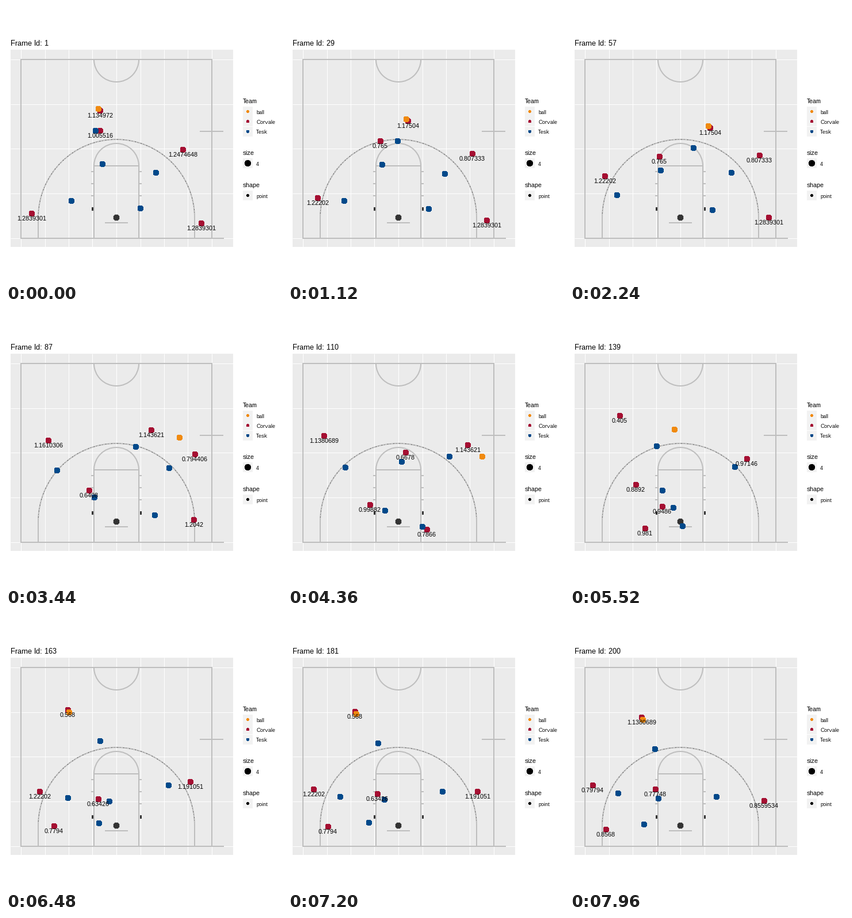
A matplotlib script for the animation above (8 s loop, 480x480 px).

```python
import matplotlib.pyplot as plt
import numpy as np
from matplotlib.animation import FuncAnimation
from matplotlib.patches import Arc, Circle, Rectangle

SIZE, DPI, FRAMES, STEP = 480, 100, 200, 40
PT = 72 / DPI
RED, BLUE, ORANGE = "#A50F32", "#00498A", "#F08A10"
GRAY, DARK = "#BEBEBE", "#333333"
LEFT, RIGHT, TOP, BASE = 26, 358, 93, 404      # half court
MID, RIM, LANE, REACH = 192, 368, 39, 136      # centre, rim, key and arc radii

plt.rcParams.update({
    "font.family": "Liberation Sans",
    "text.hinting": "native",
    "text.hinting_factor": 1,
})

fig = plt.figure(figsize=(SIZE / DPI, SIZE / DPI), dpi=DPI, facecolor="white")
ax = fig.add_axes([0, 0, 1, 1])
ax.set_xlim(0, SIZE)
ax.set_ylim(SIZE, 0)
ax.axis("off")


def line(xs, ys, color=GRAY, width=2, z=2):
    ax.plot(xs, ys, color=color, lw=width * PT, zorder=z,
            solid_capstyle="butt", solid_joinstyle="miter")


def box(x0, y0, x1, y1, color, z=1):
    ax.add_patch(Rectangle((x0, y0), x1 - x0, y1 - y0, fc=color, lw=0, zorder=z))


def dot(x, y, r, color, z=3):
    return ax.add_patch(Circle((x, y), r, fc=color, lw=0, zorder=z, antialiased=False))


def arc(y, r, start, end, color=GRAY, width=2, dash="-"):
    ax.add_patch(Arc((MID, y), 2 * r, 2 * r, theta1=start, theta2=end,
                     ec=color, lw=width * PT, ls=dash, zorder=2))


def text(x, y, s, px, ha="left"):
    return ax.text(x, y, s, fontsize=px * PT, ha=ha, va="baseline", zorder=6)


def draw_court():
    box(8, 76, 395, 419, "#EBEBEB", 0)
    for x in np.linspace(LEFT, RIGHT, 9).round() - 0.5:
        line([x, x], [76, 419], "white", 1, 1)
    for y in np.linspace(TOP, BASE, 5).round() - 0.5:
        line([8, 395], [y, y], "white", 1, 1)

    line([LEFT, LEFT, RIGHT, RIGHT], [BASE, TOP, TOP, BASE])
    line([LEFT - 1, 379], [BASE, BASE])
    line([337, 378], [218, 218])
    arc(TOP, LANE, 0, 180)

    foul = 278
    line([MID - LANE, MID - LANE, MID + LANE, MID + LANE], [BASE, foul, foul, BASE])
    arc(foul, LANE, 180, 360)
    arc(RIM, REACH, 180, 360)
    arc(RIM, REACH, 183, 357, DARK, 0.8, (0, (2, 4, 1, 6)))
    for side in (-1, 1):
        edge = MID + side * (LANE + 3)
        for y in (288, 309, 330):
            line([edge - 2, edge + 2], [y, y])
        box(edge - 1.5, 350, edge + 1.5, 356, DARK, 2)
        line([MID + side * REACH] * 2, [BASE, RIM])

    line([MID - 20, MID + 20], [377, 377])
    dot(MID, RIM, 5.5, GRAY, 2)
    dot(MID, RIM, 4.7, DARK, 2)


def draw_legend():
    def group(y, heading, *rows):
        text(412, y, heading, 11)
        for k, (label, color, r) in enumerate(rows):
            mid = y + 14.5 + 17.3 * k
            box(412, mid - 8.6, 429, mid + 8.6, "#F2F2F2")
            dot(420.5, mid, r, color)
            text(435, mid + 4, label, 9)

    group(169, "Team", ("ball", ORANGE, 2), ("Corvale", RED, 2), ("Tesk", BLUE, 2))
    group(259, "size", ("4", "black", 5))
    group(315, "shape", ("point", "black", 2))


BEATS = np.array([0, 56, 86, 109, 138, 162, 199])
NOW = np.arange(FRAMES)
STAGE = np.searchsorted((BEATS[1:] + BEATS[:-1]) / 2, NOW, "right")


def glide(times, points):
    """Smooth curve through the points, one position per frame."""
    p = np.array(points, float)
    m = np.gradient(p, times, axis=0)
    k = np.clip(np.searchsorted(times, NOW, "right") - 1, 0, len(times) - 2)
    h = (times[k + 1] - times[k])[:, None]
    u = (NOW - times[k])[:, None] / h
    ease = u * u * (3 - 2 * u)
    return (p[k] * (1 - ease) + p[k + 1] * ease
            + h * u * (1 - u) * (m[k] * (1 - u) - m[k + 1] * u))


def guard(man, *gaps):
    """A defender moves with his man while the gap between them shifts."""
    return man + glide(BEATS[::2], gaps)


def throw(start, end, first, last):
    """Share of a pass completed, and the flight from one holder to the next."""
    u = np.clip((NOW - first) / (last - first), 0, 1)[:, None]
    lift = np.hstack([0 * u, -16 * np.sin(np.pi * u)])
    return start + (end - start) * u + lift


handler = glide(BEATS, [(164, 182), (244, 212), (253, 209), (205, 248),
                        (161, 342), (161, 322), (149, 305)])
screener = glide(BEATS, [(164, 217), (156, 262), (145, 314), (143, 339),
                         (115, 304), (59, 309), (40, 298)])
wing = glide(BEATS, [(308, 250), (330, 260), (329, 251), (313, 235),
                     (308, 259), (321, 292), (338, 325)])
trailer = glide(BEATS, [(45, 361), (61, 296), (74, 227), (63, 219),
                        (87, 184), (108, 167), (125, 180)])
runner = glide(BEATS, [(340, 378), (346, 368), (327, 365), (242, 382),
                       (131, 380), (84, 369), (63, 375)])

attack = [
    (handler, "1.134972 1.17504 1.143621 0.6678 0.9486 0.63426 0.77748"),
    (screener, "1.005516 0.765 0.6408 0.99882 0.8892 1.22202 0.79794"),
    (wing, "1.2474648 0.807333 0.794406 1.143621 0.97146 1.191051 0.8559534"),
    (trailer, "1.2839301 1.22202 1.1610306 1.1380689 0.405 0.568 1.1380689"),
    (runner, "1.2839301 1.2839301 1.2042 0.7866 0.981 0.7794 0.8568"),
]
defence = [
    guard(handler, (-8, 35), (-27, 29), (19, 2), (5, 16)),
    guard(screener, (4, 58), (9, 12), (46, 10), (44, 14)),
    guard(wing, (-47, 40), (-45, 24), (-21, 14), (-83, -7)),
    guard(trailer, (69, -22), (15, 52), (64, 53), (23, 55)),
    guard(runner, (-106, -26), (-68, -8), (65, -4), (66, -9)),
]

# the ball goes from handler to wing, then across to the trailer
held = throw(handler + (-3, -3), wing + (25, 20), 77, 95)
ball = np.where(NOW[:, None] < 120, held,
                throw(wing + (25, 20), trailer + (2, 4), 120, 149))

draw_court()
draw_legend()
title = text(8, 69, "", 13)
movers = [(dot(0, 0, 5, RED), route, text(0, 0, "", 11, "center"), values.split())
          for route, values in attack]
movers += [(dot(0, 0, 5, BLUE), route, None, None) for route in defence]
movers.append((dot(0, 0, 5, ORANGE, 4), ball, None, None))


def update(i):
    title.set_text(f"Frame Id: {i + 1}")
    for mark, route, label, values in movers:
        x, y = route[i].round()
        mark.center = x, y
        if label:
            label.set_position((x - 0.5, y + 12))
            label.set_text(values[STAGE[i]])
    return []


anim = FuncAnimation(fig, update, frames=FRAMES, interval=STEP,
                     init_func=lambda: update(0), repeat=True, repeat_delay=0)
plt.show()
```
